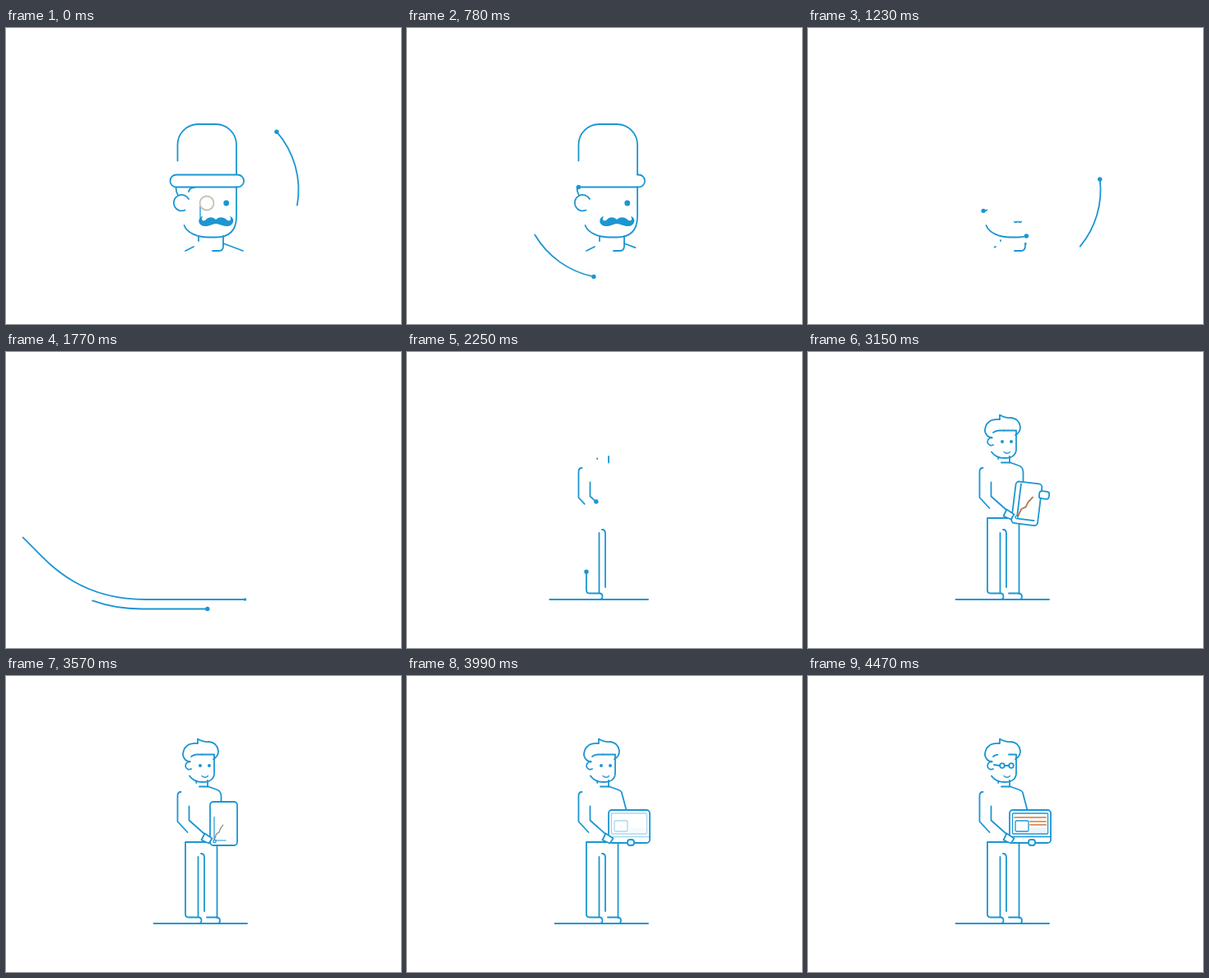
These frames come from a looping animation (480x360 px, 4500 ms). An HTML page:

```html
<!DOCTYPE html>
<html lang="en">
<head>
<meta charset="utf-8">
<title>Line characters</title>
<style>
  html, body { margin: 0; width: 100%; height: 100%; overflow: hidden; background: #fff; }
  svg { display: block; width: 100vw; height: 100vh; fill: none; stroke: #1c96d2;
        stroke-width: 1.8; stroke-linecap: round; stroke-linejoin: round; }
  .dot { fill: #1c96d2; stroke: none; }
  .white { fill: #fff; }
  .thin { stroke-width: 1.3; }
</style>
</head>
<body>
<svg id="stage" viewBox="0 0 480 360"></svg>
<script>
const LOOP = 4500, STEP = 30;
const stage = document.getElementById('stage');
const updates = [];

function add(tag, attrs, parent = stage) {
  const el = document.createElementNS('http://www.w3.org/2000/svg', tag);
  set(el, attrs);
  return parent.appendChild(el);
}

function set(el, attrs) {
  for (const name in attrs) el.setAttribute(name, attrs[name]);
}

// Value at time t from alternating time, value pairs.
function at(t, keys, ease = u => u) {
  if (t <= keys[0]) return keys[1];
  for (let i = 2; i < keys.length; i += 2) {
    if (t < keys[i]) {
      const u = (t - keys[i - 2]) / (keys[i] - keys[i - 2]);
      return keys[i - 1] + (keys[i + 1] - keys[i - 1]) * ease(u);
    }
  }
  return keys[keys.length - 1];
}

const smooth = u => u * u * (3 - 2 * u);
const show = (el, on) => el.style.display = on ? '' : 'none';

// A path trimmed between two animated fractions, with an optional dot at one end.
function stroke(d, from, to, { tip, parent = stage, cls = '', shape, r = 2.7 } = {}) {
  const path = add('path', { d, class: cls }, parent);
  const dot = tip && add('circle', { r, class: 'dot' }, parent);
  let length = path.getTotalLength();
  updates.push(t => {
    if (shape) {
      path.setAttribute('d', shape(t));
      length = path.getTotalLength();
    }
    const a = at(t, from), b = at(t, to);
    show(path, b - a > 0.002);
    const whole = a === 0 && b === 1;
    path.style.strokeDasharray = whole ? 'none' : `${(b - a) * length} ${length * 2}`;
    path.style.strokeDashoffset = -a * length;
    if (dot) {
      const end = tip === 'from' ? a : b;
      show(dot, b - a > 0.002 && end > 0 && end < 1);
      const p = path.getPointAtLength(end * length);
      set(dot, { cx: p.x, cy: p.y });
    }
  });
  return path;
}

const draw = (d, start, end, options) => stroke(d, [0, 0], [start, 0, end, 1], options);
const erase = (d, start, end, options) =>
  stroke(d, [start, 0, end, 1], [0, 1], { tip: 'from', ...options });

function pop(el, keys, x, y) {
  updates.push(t => {
    const s = at(t, keys, smooth);
    show(el, s > 0.01);
    el.setAttribute('transform', `translate(${x} ${y}) scale(${s}) translate(${-x} ${-y})`);
  });
}

function gentleman() {
  const still = { tip: '' };
  erase('M208.5 161.5V142A25 25 0 0 1 233.5 117H255A25 25 0 0 1 280 142V178', 790, 1080);
  erase('M280 178.5H207A7.5 7.5 0 0 0 207 193.5H281.5A7.5 7.5 0 0 0 281.5 178.5Z', 560, 1000);
  erase('M280 193.5V229C280 246 271 254.5 255 254.5H246C232 254.5 220 249 216.5 240', 1000, 1420);
  erase('M206.5 194Q206.5 199 209 203.5', 840, 940, still);
  erase('M222 208A9.7 9.7 0 1 0 217.5 221.5', 960, 1260);
  erase('M222 199Q223 194 229 194', 300, 600, still);
  erase('M236 217V229Q236 233 238 234', 60, 320, { tip: '', cls: 'thin' });
  erase('M234 254.5V259', 1150, 1250, still);
  erase('M264 253V265Q264 271 259 271H251', 1150, 1400, still);
  erase('M218 271L228 266', 1100, 1250, still);
  stroke('M264 262L288 271', [0, 0], [0, 1, 780, 0.56, 1050, 0.4, 1250, 0]);

  const monocle = erase('M252.5 213A8.5 8.5 0 1 0 235.5 213A8.5 8.5 0 1 0 252.5 213', 60, 360, still);
  monocle.style.stroke = '#c9c0b4';

  pop(add('circle', { cx: 267.7, cy: 213, r: 3.4, class: 'dot' }), [1080, 1, 1200, 0], 267.7, 213);
  const moustache = add('path', {
    class: 'dot',
    d: 'M255 233C250 229 246 230 243 233C240 236 236 234 239 229C233 230 232 240 241 241' +
       'C248 241.5 251 238 255 238C259 238 263 241.5 270 241C278 240 278 230 272 229' +
       'C275 234 271 236 268 233C264 230 260 229 255 233Z'
  });
  pop(moustache, [1080, 1, 1300, 0], 255, 236);
}

function orbit() {
  const arc = add('path', {});
  const dot = add('circle', { r: 2.7, class: 'dot' });
  const point = deg => {
    const a = deg * Math.PI / 180;
    return [248 + 107.5 * Math.cos(a), 197 - 107.5 * Math.sin(a)];
  };
  updates.push(t => {
    const head = at(t, [0, 41.2, 780, 258.7, 1080, 331, 1330, 391]);
    const tail = at(t, [0, -10, 780, 210.5, 1080, 281, 1500, 391]);
    const on = head - tail > 0.5;
    show(arc, on);
    show(dot, on);
    const [x, y] = point(head);
    arc.setAttribute('d', `M${point(tail)}A107.5 107.5 0 0 0 ${x} ${y}`);
    set(dot, { cx: x, cy: y });
  });
}

function trails() {
  stroke('M-30 178L20 225C45 248 80 301 170 301H293',
    [1600, 0.08, 1650, 0.112, 1770, 0.19, 1980, 0.41, 2190, 0.62, 2250, 0.673, 2310, 0.69],
    [1250, 0.08, 1770, 0.993, 1800, 1], { tip: 'to', r: 1.8 });
  stroke('M-30 192L13 233C40 258 78 312.5 165 312.5H280',
    [1450, 0, 1770, 0.5, 2000, 1],
    [1330, 0, 1770, 0.9, 1850, 1], { tip: 'to' });
}

function body() {
  const tip = { tip: 'to' };
  draw('M233 301Q237.5 301 237.5 297.5Q237.5 293.5 234 293.5H222Q218 293.5 218 289.5V202H256.5V294',
    2130, 2690, tip);
  draw('M233.5 293V220', 2020, 2200);
  draw('M241 286V221Q241 216 237 216', 2040, 2230);
  draw('M244 293.5H256Q260 294 260 297.5Q260 301 256 301H244', 2520, 2700);
  draw('M212.5 141Q208.5 141 208.5 146V177L220.5 190', 2080, 2275);
  draw('M222.5 158.5V175.5L241 192', 2160, 2300, tip);
  draw('M245 134.5V127', 2140, 2230);
  draw('M231.2 130V128', 2230, 2290);
  stroke('M235 134.5H246L257 138.5Q261.5 140 261.5 146L261.5 163', [0, 0],
    [2360, 0, 2500, 0.34, 2850, 0.34, 3080, 1], {
      shape: t => {
        const k = at(t, [3640, 0, 3900, 1], smooth);
        return `M235 134.5H246L257 138.5Q261 140 ${261.5 - 0.3 * k} ${146 - 3 * k}L${261.5 + 5 * k} 163`;
      }
    });
}

function head() {
  const tip = { tip: 'to' };
  draw('M253 96V119Q252 129 239 129Q228 129 223 121.5', 2300, 2600, tip);
  draw('M252 101Q258 98 258 91Q256.5 81 247 80Q239 80.5 233 76.5V82C222 81 215 86 215 96.5Q217 104 223.5 104',
    2420, 2860, tip);
  stroke('M225 98Q228 95.5 232 95.5H238', [0, 0], [2560, 0, 2700, 1, 4100, 1, 4380, 0.45]);
  stroke('M253 95.5H238', [0, 0], [2560, 0, 2700, 1, 4100, 1, 4380, 0.6]);
  draw('M223.5 104.5A4.6 4.6 0 1 0 225 113', 2860, 2980);
  draw('M238 121.5Q242 125 245.5 121.5', 2950, 3080, { cls: 'thin' });
  for (const x of [236, 247]) {
    pop(add('circle', { cx: x, cy: 109, r: 2, class: 'dot' }), [2900, 0, 3000, 1, 4100, 1, 4160, 0], x, 109);
    pop(add('circle', { cx: x, cy: 109, r: 2.8, class: 'white' }), [4120, 0, 4300, 1], x, 109);
  }
  draw('M226 108L233 109', 4120, 4280);
  draw('M239 109H244', 4120, 4280);
}

function device() {
  const group = add('g', {});
  const board = add('rect', { rx: 4, class: 'white' }, group);
  const chart = add('g', {}, group);
  draw('M0 0V-42.5', 2560, 2700, { parent: chart });
  draw('M1 0H21', 2560, 2700, { parent: chart });
  const graph = draw('M1 -3L4 -12L9 -15L11 -21L16 -28', 2650, 2810, { parent: chart });

  const opening = [3900, 0, 4140, 1];
  const screen = add('g', {}, group);
  add('rect', { x: -21.5, y: -16, width: 43, height: 25, rx: 1, class: 'thin' }, screen);
  add('path', { d: 'M-25 12.5H25', class: 'thin' }, screen);
  add('rect', { x: 0, y: 1.5, width: 19, height: 6, fill: '#e8f4fb', stroke: 'none' }, screen);
  add('rect', { x: -18, y: -7, width: 16, height: 13, rx: 1.5, class: 'white thin' }, screen);
  ['M-19 -11H19', 'M0 -6H19', 'M0 -2H19'].forEach((d, i) => {
    const row = draw(d, 4000 + i * 60, 4150 + i * 60, { parent: screen });
    row.style.stroke = '#df9a68';
  });

  updates.push(t => {
    const key = (tilted, upright, wide, final = wide) =>
      at(t, [3280, tilted, 3480, upright, 3620, upright, 3880, wide, 3980, final], smooth);
    const w = key(32, 33, 54, 50), h = key(51, 53, 38, 40), grow = at(t, [2440, 0, 2640, 1], smooth);
    show(group, grow > 0.01);
    group.setAttribute('transform',
      `translate(${key(265.8, 264.5, 270)} ${key(184.3, 179.5, 183)}) rotate(${key(7, 0, 0)}) scale(${grow})`);
    set(board, { x: -w / 2, y: -h / 2, width: w, height: h });

    const fade = at(t, [3400, 1, 3570, 0.67, 3700, 0]);
    show(chart, fade > 0.02);
    chart.setAttribute('transform',
      `translate(${key(-9.7, -11.5, -11.5)} ${key(19.5, 20.5, 20.5)}) scale(${fade})`);
    graph.style.stroke = `hsl(20 ${at(t, [3300, 48, 3560, 0])}% 52%)`;
    screen.style.opacity = at(t, opening);
    show(screen, t > opening[0]);
  });
}

function hands() {
  const near = add('path', { d: 'M241.5 191.5L250.5 197.5L246.5 203.5L237.5 199.5Z', class: 'white' });
  pop(near, [2380, 0, 2500, 1], 244, 197);
  const thumb = add('circle', { cx: 253.5, cy: 201, r: 1.6, class: 'white thin' });
  pop(thumb, [2500, 0, 2600, 1, 3600, 1, 3700, 0], 253.5, 201);
  const side = add('rect', { x: 281, y: 169.5, width: 12, height: 9, rx: 3, class: 'white',
    transform: 'rotate(7 287 174)' });
  const sideWrap = add('g', {});
  sideWrap.appendChild(side);
  pop(sideWrap, [2600, 0, 2720, 1, 3300, 1, 3440, 0], 282, 174);
  const under = add('rect', { x: 268, y: 199, width: 8, height: 7, rx: 3, class: 'white' });
  pop(under, [3820, 0, 3980, 1], 272, 202.5);
}

gentleman();
orbit();
trails();
body();
head();
device();
hands();

function render(now) {
  const t = Math.floor((now % LOOP) / STEP) * STEP;
  for (const update of updates) update(t);
}

let begin;
function frame(now) {
  begin ??= now;
  render(now - begin);
  requestAnimationFrame(frame);
}
render(0);
requestAnimationFrame(frame);
</script>
</body>
</html>
```
